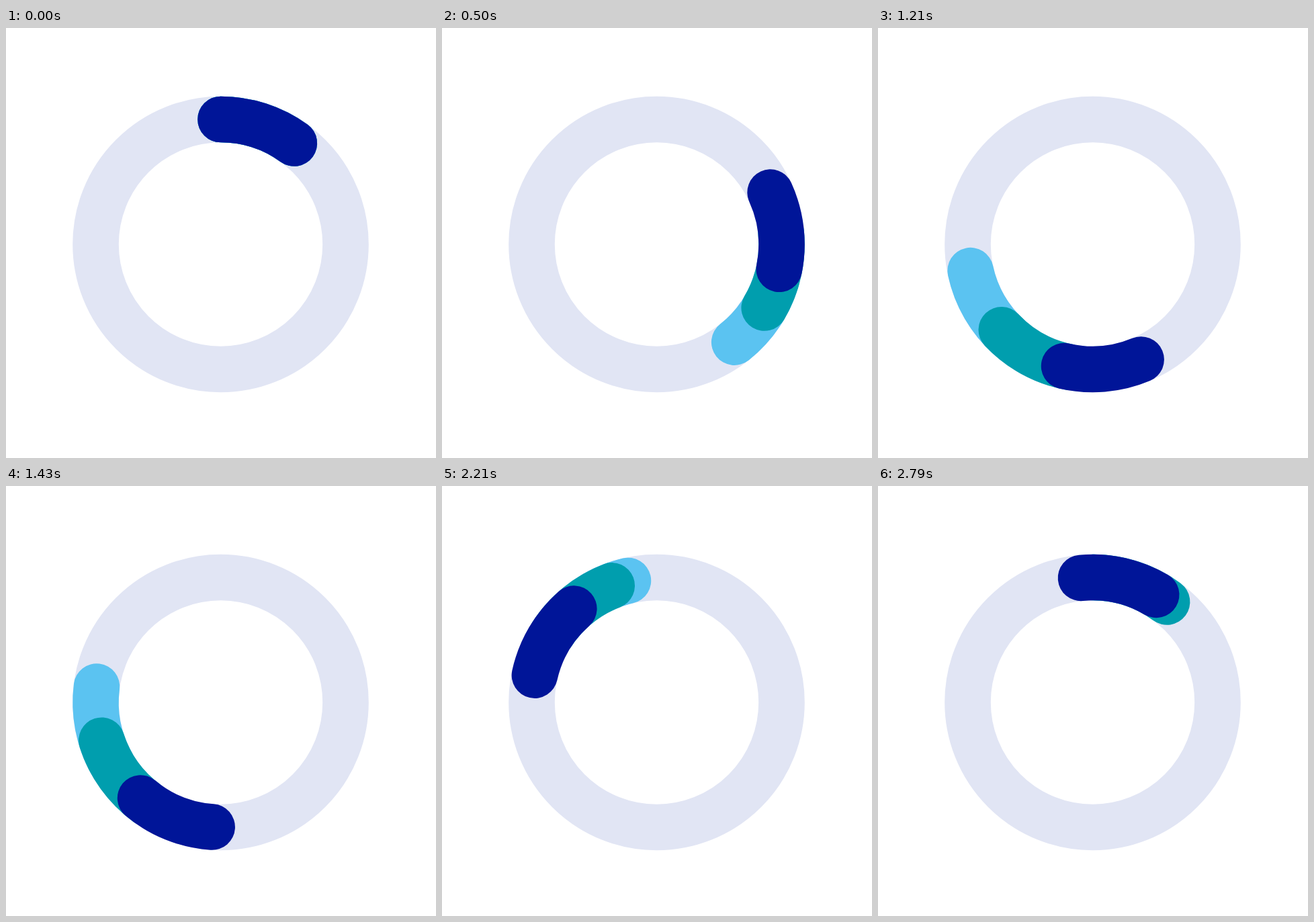
These frames come from a looping animation (640 by 640 pixels, 2870 ms). An HTML page:

```html
<!DOCTYPE html>
<html lang="en">
<head>
<meta charset="utf-8">
<title>Ring loader</title>
<style>
  html, body { margin: 0; height: 100%; overflow: hidden; background: #fff; }
  svg { display: block; width: 100vw; height: 100vh; }
  circle { fill: none; stroke-width: 68.6; stroke-linecap: round; }
</style>
</head>
<body>
<svg viewBox="0 0 640 640">
  <g id="ring" transform="translate(319.5 322) rotate(-90)"></g>
</svg>
<script>
const LOOP = 2870, FPS = 14, LAST = 39;
const ring = document.getElementById('ring');

function addCircle(stroke, dash) {
  const el = document.createElementNS('http://www.w3.org/2000/svg', 'circle');
  const attrs = { r: 186, stroke, pathLength: 360, 'stroke-dasharray': dash };
  for (const name in attrs) el.setAttribute(name, attrs[name]);
  ring.append(el);
  return el;
}

addCircle('#e1e5f4', 'none');

// Back to front: each arc turns at a steady speed through each third of the loop.
const arcs = [
  { color: '#5bc3f1', stops: [0, 196, 280, 360] },
  { color: '#009eae', stops: [0, 157, 267, 360.5] },
  { color: '#001598', stops: [0, 121.5, 237.5, 354.6] }
];
for (const arc of arcs) arc.el = addCircle(arc.color, '36 324');

function angleAt(stops, progress) {
  const x = progress * (stops.length - 1);
  const i = Math.min(Math.floor(x), stops.length - 2);
  return stops[i] + (stops[i + 1] - stops[i]) * (x - i);
}

function draw(now) {
  const t = now % LOOP;
  const step = Math.min(LAST, Math.floor((t + 5) * FPS / 1000));
  for (const { el, stops } of arcs) {
    el.setAttribute('transform', `rotate(${angleAt(stops, step / LAST)})`);
  }
  requestAnimationFrame(draw);
}

draw(performance.now());
</script>
</body>
</html>
```
